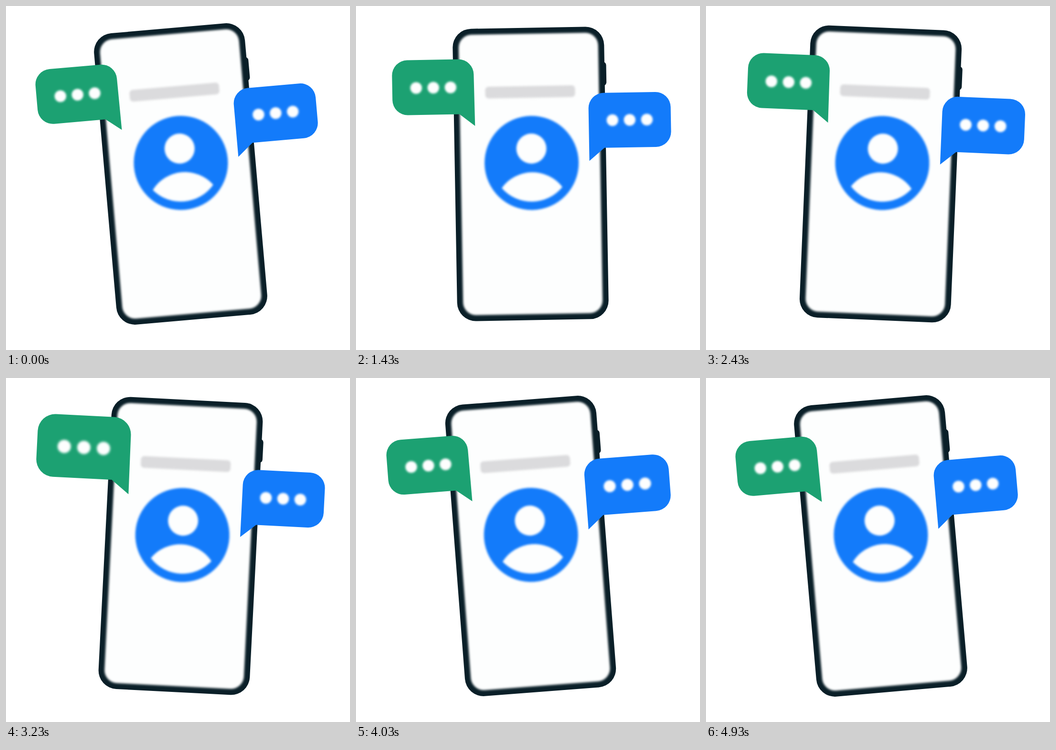
An HTML page that plays this animation: 720 px wide and 720 px high, repeating every 5010 ms.

```html
<!DOCTYPE html>
<html lang="en">
<head>
<meta charset="utf-8">
<title>Chat phone</title>
<style>
  html, body { margin: 0; height: 100%; overflow: hidden; background: #fff; }
  svg { display: block; width: 100vw; height: 100vh; }
  .soft { filter: blur(2.1px); }
  .ink { fill: #0a1f28; }
  .white { fill: #fdfefe; }
  .blue { fill: #137bfa; }
  .green { fill: #1ca172; }
</style>
</head>
<body>
<svg viewBox="0 0 720 720">
  <g id="phone">
    <rect class="ink" x="146" y="-232" width="16" height="50" rx="7"/>
    <rect class="ink" x="-158.5" y="-306" width="317" height="612" rx="39"/>
    <rect class="white soft" x="-146" y="-293.5" width="292" height="587" rx="27"/>
    <rect class="soft" x="-92" y="-184" width="188" height="24.5" rx="7" fill="#dbdbdd"/>
    <circle class="blue soft" cx="2.5" cy="-23" r="98.5"/>
    <g class="white soft">
      <circle cx="2.5" cy="-53" r="31.5"/>
      <path d="M-61 28.5A79 79 0 0 1 66 28.5A83 83 0 0 1 -61 28.5Z"/>
    </g>
    <!-- Each bubble has its tail tip at the local origin. -->
    <g id="greenBubble">
      <path class="green" d="M0 0L-32 -25H-140A32 32 0 0 1 -172 -57V-108A32 32 0 0 1 -140 -140H-32A32 32 0 0 1 -1 -108Z"/>
      <g class="white soft">
        <circle cx="-122" cy="-81.5" r="12.2"/>
        <circle cx="-86" cy="-81.5" r="12.2"/>
        <circle cx="-50" cy="-81.5" r="12.2"/>
      </g>
    </g>
    <g id="blueBubble">
      <path class="blue" d="M0 0L32 -27H140A32 32 0 0 0 172 -59V-110A32 32 0 0 0 140 -142H32A32 32 0 0 0 0 -110Z"/>
      <g class="white soft">
        <circle cx="49.7" cy="-84.5" r="12.2"/>
        <circle cx="85.7" cy="-84.5" r="12.2"/>
        <circle cx="121.7" cy="-84.5" r="12.2"/>
      </g>
    </g>
  </g>
</svg>
<script>
const LOOP = 5010;
const TILT = [
  [0, -5], [430, -4.3], [730, -3.1], [1430, -1], [2430, 2.4], [2650, 2.9],
  [3330, 2.9], [3500, 2.1], [3830, -2.1], [4030, -4.4], [4180, -5], [LOOP, -5]
];
const [phone, greenBubble, blueBubble] =
  ['phone', 'greenBubble', 'blueBubble'].map(id => document.getElementById(id));

function tiltAt(t) {
  const i = TILT.findIndex(([time]) => time > t);
  const [t0, a0] = TILT[i - 1], [t1, a1] = TILT[i];
  return a0 + (a1 - a0) * (t - t0) / (t1 - t0);
}

function pulse(t, start, end) {
  return t > start && t < end ? Math.sin(Math.PI * (t - start) / (end - start)) : 0;
}

function place(bubble, x, y, scale) {
  bubble.setAttribute('transform', `translate(${x} ${y}) scale(${scale})`);
}

// Poses advance in alternating 30 ms and 70 ms steps.
function stepped(t) {
  const base = Math.min(Math.floor(t / 100) * 100, 4900);
  return base + (t - base >= 30 ? 30 : 0);
}

function draw(now) {
  const t = stepped(now % LOOP);
  phone.setAttribute('transform', `translate(365.5 351.5) rotate(${tiltAt(t)})`);
  place(greenBubble, -114.5, -102.5, 1 + 0.142 * (pulse(t, 130, 1130) + pulse(t, 2650, 3830)));
  place(blueBubble, 123.5, -25, 1 + 0.13 * (pulse(t, 1550, 2450) + pulse(t, 3960, 4930)));
}

const start = performance.now();
function tick() {
  draw(performance.now() - start);
  requestAnimationFrame(tick);
}
tick();
</script>
</body>
</html>
```
